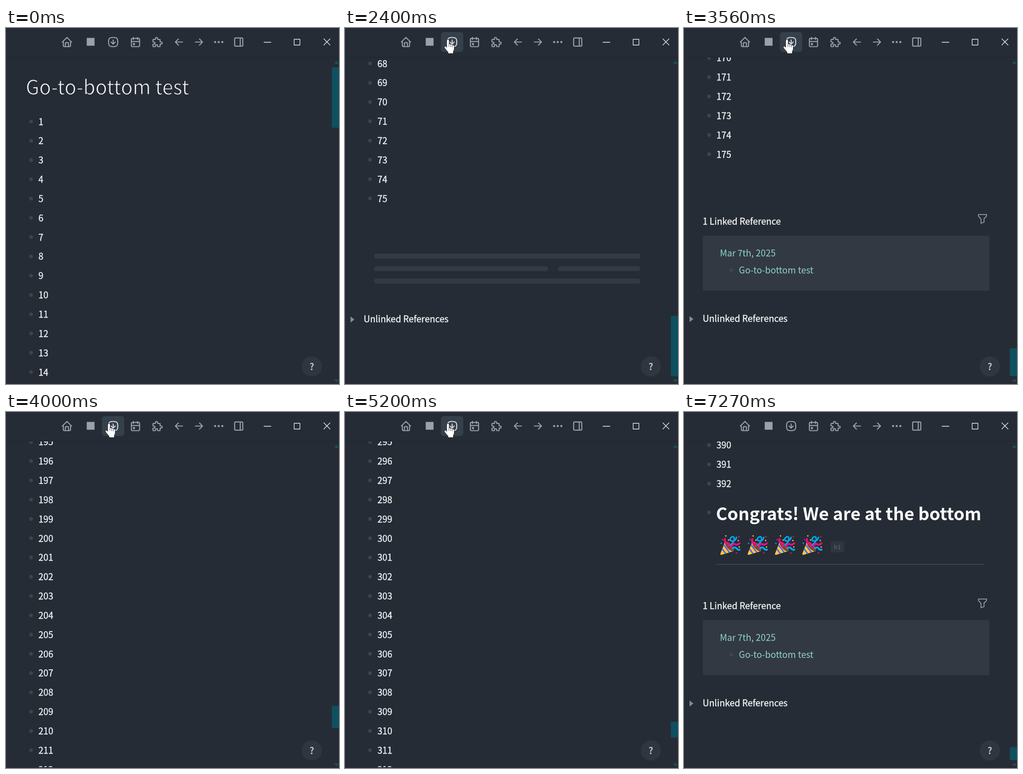
An HTML page with a canvas for the animation above (8140 ms loop, 724 by 773 pixels).

```html
<!DOCTYPE html>
<html lang="en">
<head>
<meta charset="utf-8">
<title>Go-to-bottom test</title>
<style>
html, body { margin: 0; width: 100%; height: 100%; overflow: hidden; background: #262c35; }
canvas { display: block; }
</style>
</head>
<body>
<canvas id="stage" width="724" height="773"></canvas>
<script>
const ctx = document.getElementById('stage').getContext('2d');
const LOOP = 8140, PITCH = 41.85, TOP = 64, BOTTOM = 773, FIRST = 203.5, LAST = 392;
const BG = '#262c35', GREY = '#9ba1a8', WHITE = '#f1f3f4', DOT = '#3c444d', TEAL = '#90d2d1';
const SANS = '"Noto Sans CJK SC", "Noto Sans CJK JP", "Noto Sans CJK", "Noto Sans", sans-serif';
const BODY = 19.4;

// Alternately: end of list reached, next 25 rows appended
const loads = [2640, 2840, 2960, 3120, 3280, 3400, 3560, 3720, 3880, 4000, 4200, 4320,
  4440, 4640, 4760, 4960, 5080, 5200, 5360, 5520, 5680, 5840, 5920, 6120];

const pointer = [[620, 56, 742], [800, 80, 500], [940, 130, 294], [1140, 192.5, 136],
  [1300, 220, 66], [1420, 226.5, 40], [7070, 226.5, 40], [7150, 228, 22], [7260, 230, -17]];

const icons = {
  home: 'M5 12H3l9-9 9 9h-2M5 12v7a2 2 0 0 0 2 2h10a2 2 0 0 0 2-2v-7M9 21v-6a2 2 0 0 1 2-2h2a2 2 0 0 1 2 2v6',
  down: 'M8 12l4 4 4-4M12 8v8M12 3c7.2 0 9 1.8 9 9s-1.8 9-9 9-9-1.8-9-9 1.8-9 9-9z',
  calendar: 'M6 5h12a2 2 0 0 1 2 2v12a2 2 0 0 1-2 2h-12a2 2 0 0 1-2-2v-12a2 2 0 0 1 2-2zM16 3v4M8 3v4M4 11h16M8 15h2v2h-2z',
  puzzle: 'M4 7h3a1 1 0 0 0 1-1v-1a2 2 0 0 1 4 0v1a1 1 0 0 0 1 1h3a1 1 0 0 1 1 1v3a1 1 0 0 0 1 1h1a2 2 0 0 1 0 4h-1a1 1 0 0 0-1 1v3a1 1 0 0 1-1 1h-3a1 1 0 0 1-1-1v-1a2 2 0 0 0-4 0v1a1 1 0 0 1-1 1h-3a1 1 0 0 1-1-1v-3a1 1 0 0 1 1-1h1a2 2 0 0 0 0-4h-1a1 1 0 0 1-1-1v-3a1 1 0 0 1 1-1',
  left: 'M5 12h14M11 18l-6-6 6-6',
  right: 'M5 12h14M13 18l6-6-6-6',
  sidebar: 'M6 4h12a2 2 0 0 1 2 2v12a2 2 0 0 1-2 2h-12a2 2 0 0 1-2-2v-12a2 2 0 0 1 2-2zM15 4v16',
  filter: 'M4 4h16v2.2a2 2 0 0 1-.6 1.4L15 12v7l-6 2v-8.5L4.5 7.6A2 2 0 0 1 4 6.2z'
};
const hand = new Path2D('M5.6 2.4a2.2 2.2 0 0 1 4.4 0V10q3.2-1.4 3.9 1q3-.9 3.6 1.2q3.5-.6 3.5 2.4V20q0 3-2 5.5V30H8.5V27.5L1 18.5q-1.6-3 1-3.5q1.6 0 3.6 2.7z');
const knuckles = new Path2D('M10 10v5.5M13.9 11v5M17.5 12.2v4.5');

function fill(path, color) { ctx.fillStyle = color; ctx.fill(path); }
function stroke(path, color, width) {
  ctx.strokeStyle = color; ctx.lineWidth = width; ctx.stroke(path);
}
function rect(x, y, w, h, color, r = 0) {
  const p = new Path2D(); p.roundRect(x, y, w, h, r); fill(p, color);
}
function circle(x, y, r, color) {
  const p = new Path2D(); p.arc(x, y, r, 0, 7); fill(p, color);
}
function at(x, y, scale, draw) {
  ctx.save(); ctx.translate(x, y); ctx.scale(scale, scale); draw(); ctx.restore();
}
function icon(name, x, y = 30.5, color = GREY, width = 2) {
  at(x, y, 1.11, () => {
    ctx.translate(-12, -12);
    stroke(new Path2D(icons[name]), color, width);
  });
}
function setFont(size, weight = 400, family = SANS) { ctx.font = `${weight} ${size}px ${family}`; }
function text(s, x, y, size, color = WHITE, weight = 400, family = SANS) {
  setFont(size, weight, family);
  ctx.fillStyle = color;
  ctx.fillText(s, x, y);
}
function widthAt(weight) { setFont(100, weight); return ctx.measureText('bottom').width; }

// Without light and medium faces, strokes thin or thicken the regular one
const allWeights = widthAt(300) !== widthAt(400);
function outline(s, x, y, color, width) {
  if (allWeights) return;
  ctx.strokeStyle = color; ctx.lineWidth = width; ctx.strokeText(s, x, y);
}
function title(y) {
  const s = 'Go-to-bottom test';
  text(s, 43, y, allWeights ? 43.5 : 42.5, WHITE, 300);
  outline(s, 43, y, BG, 1.2);
}
function label(s, x, y) {
  text(s, x, y, BODY, WHITE, 500);
  outline(s, x, y, WHITE, 0.4);
}

// Row k sits at height y; n rows are loaded
function view(t) {
  if (t < 2400) return { k: 1, y: FIRST, n: 75, loading: true };
  if (t < 2440) return { k: 75, y: 370.5, n: 75, loading: true };
  if (t < 2640) return { k: 75, y: 370.5, n: t < 2520 ? 75 : 100 };
  if (t >= 6240) return { k: LAST, y: 156, n: LAST };
  const i = loads.filter(s => t >= s).length - 1, k = 100 + 25 * (i >> 1);
  return { k, y: 274.5, n: Math.min(LAST, k + 25 * (i & 1)) };
}

function popper(x, y) {
  at(x, y, 1, () => {
    const cone = new Path2D('M0 41L10 15Q22 20 29 35L3 43Q0 44 0 41z');
    fill(cone, '#ffc83d');
    ctx.save();
    ctx.clip(cone);
    stroke(new Path2D('M3 29L15 45M7 21L24 43M12 15L31 38'), '#4f62f5', 3);
    ctx.restore();
    ctx.save();
    ctx.translate(20, 25);
    ctx.rotate(0.82);
    const mouth = new Path2D();
    mouth.ellipse(0, 0, 13.5, 5.5, 0, 0, 7);
    fill(mouth, '#7d4533');
    ctx.restore();
    stroke(new Path2D('M17 24Q20 18 14 17Q8 16 10 9'), '#f50a8c', 4);
    stroke(new Path2D('M22 22Q32 13 30 6Q27 1 22 7Q19 13 27 13Q34 12 35 5'), '#00a6ed', 3.2);
    stroke(new Path2D('M24 25Q28 17 32 20Q36 23 42 18'), '#f50a8c', 4);
    stroke(new Path2D('M27 29Q32 25 35 29Q38 33 42 32'), '#00a6ed', 4);
    [[12, 2, '#ffc83d'], [5, 10, '#f50a8c'], [2, 18, '#00a6ed'], [18, 11, '#ffc83d'],
      [40, 4, '#f50a8c'], [39, 12, '#ffc83d'], [35, 39, '#f50a8c'], [41, 26, '#ffc83d']]
      .forEach(([a, b, c]) => circle(a, b, 1.6, c));
  });
}

function finale(y) {
  circle(54.5, y + 62, 4, DOT);
  text('Congrats! We are at the bottom', 69.5, y + 79, 37.8, '#fbfcfc', 700);
  for (let i = 0; i < 4; i++) popper(79 + 59.4 * i, y + 111);
  rect(319, y + 125.5, 29.5, 23, '#2f363f', 3);
  text('h1', 326, y + 142, 13, '#626a72', 400, '"Noto Sans Mono", monospace');
  rect(71, y + 174, 582, 1.5, '#444b54');
}

function skeleton(y) {
  [[63, 0, 579], [63, 27, 378.5], [463, 27, 179], [63, 54, 579]]
    .forEach(([x, dy, w]) => rect(x, y + dy, w, 11, '#333a43', 5.5));
}

function linked(d) {
  label('1 Linked Reference', 40.5, 427 + d);
  icon('filter', 649, 414 + d, GREY, 1.6);
  rect(41, 451 + d, 623, 119.5, '#323942', 4);
  text('Mar 7th, 2025', 78, 496 + d, BODY, TEAL);
  circle(103, 526 + d, 4, DOT);
  text('Go-to-bottom test', 119.3, 533 + d, BODY, TEAL);
}

function page({ k, y, n, loading }) {
  const rowY = i => y + (i - k) * PITCH;
  const scroll = FIRST - rowY(1), end = rowY(n);
  if (scroll < 200) title(143.5 - scroll);
  for (let i = 1; i <= n; i++) {
    const v = rowY(i);
    if (v < 40 || v > 800) continue;
    circle(54.5, v - 0.5, 4, DOT);
    label(i, 70.5, v + 7);
  }
  const tail = loading ? 402.5 : n < LAST ? 498.5 : 617;
  if (end < BOTTOM) {
    const shift = end + tail - BOTTOM + (loading || n === LAST ? 1 : 0);
    if (n === LAST) finale(end);
    if (loading) skeleton(end + 119.5);
    else linked(shift);
    label('Unlinked References', 40.5, 637.5 + shift);
    fill(new Path2D(`M12 ${625.5 + shift}l8.5 6.5-8.5 6.5z`), '#858b92');
  }
  const height = FIRST - TOP + (n - 1) * PITCH + tail;
  const thumb = Math.ceil(670 * (BOTTOM - TOP) / height);
  rect(708.5, 85.5 + 670 * scroll / height, 15.5, thumb, '#0f5060');
  fill(new Path2D('M713 77.5l5.5-5.5 5.5 5.5zM713 763.5l5.5 5.5 5.5-5.5z'), '#135460');
}

function header(hover) {
  rect(0, 0, 724, 63, BG);
  rect(0, 63, 724, 1, '#1f252d');
  if (hover) rect(208.5, 9, 48.5, 43, '#35404a', 6);
  icon('home', 132.5);
  rect(175.5, 21.5, 17, 17, GREY);
  icon('down', 233, 30.5, hover ? '#d3d8dc' : GREY);
  icon('calendar', 281.5);
  icon('puzzle', 329.5);
  icon('left', 376);
  icon('right', 419.5);
  [454.7, 462.5, 470.3].forEach(x => circle(x, 30.5, 2.3, GREY));
  icon('sidebar', 506);
  stroke(new Path2D('M561 31H576M626.5 24.5h12.5v12.5h-12.5zM691 23.5l13.5 13.5M704.5 23.5l-13.5 13.5'), '#eceeef', 1.35);
}

function pointerAt(t) {
  const i = pointer.findIndex(p => p[0] > t);
  if (i < 1) return null;
  const [t0, x0, y0] = pointer[i - 1], [t1, x1, y1] = pointer[i], u = (t - t0) / (t1 - t0);
  return [x0 + (x1 - x0) * u, y0 + (y1 - y0) * u];
}

function draw(now) {
  const t = now % LOOP;
  ctx.lineCap = ctx.lineJoin = 'round';
  rect(0, 0, 724, 773, BG);
  page(view(t));
  header(t >= 1400 && t < 7190);
  circle(665, 735, 22, '#2f3640');
  ctx.textAlign = 'center';
  text('?', 665, 743, 20, '#bcc1c6', 900);
  ctx.textAlign = 'left';
  rect(0, 771, 724, 2, '#2b2934');
  if (t >= 1910 && t < 2240) {
    rect(236, 44, 130, 34, '#2b2b2b', 3);
    text('Scroll to bottom', 244, 66, 15, '#fff', 400, '"Open Sans", sans-serif');
  }
  // The pointer moves in 40 ms ticks
  const p = pointerAt(Math.floor((t - 620) / 40) * 40 + 620);
  if (p) at(p[0] - 10.5, p[1] - 15, 1, () => {
    stroke(hand, '#15181c', 1.2);
    fill(hand, '#fff');
    stroke(knuckles, '#30343a', 0.9);
  });
}

function tick() {
  draw(performance.now());
  requestAnimationFrame(tick);
}
tick();
</script>
</body>
</html>
```
